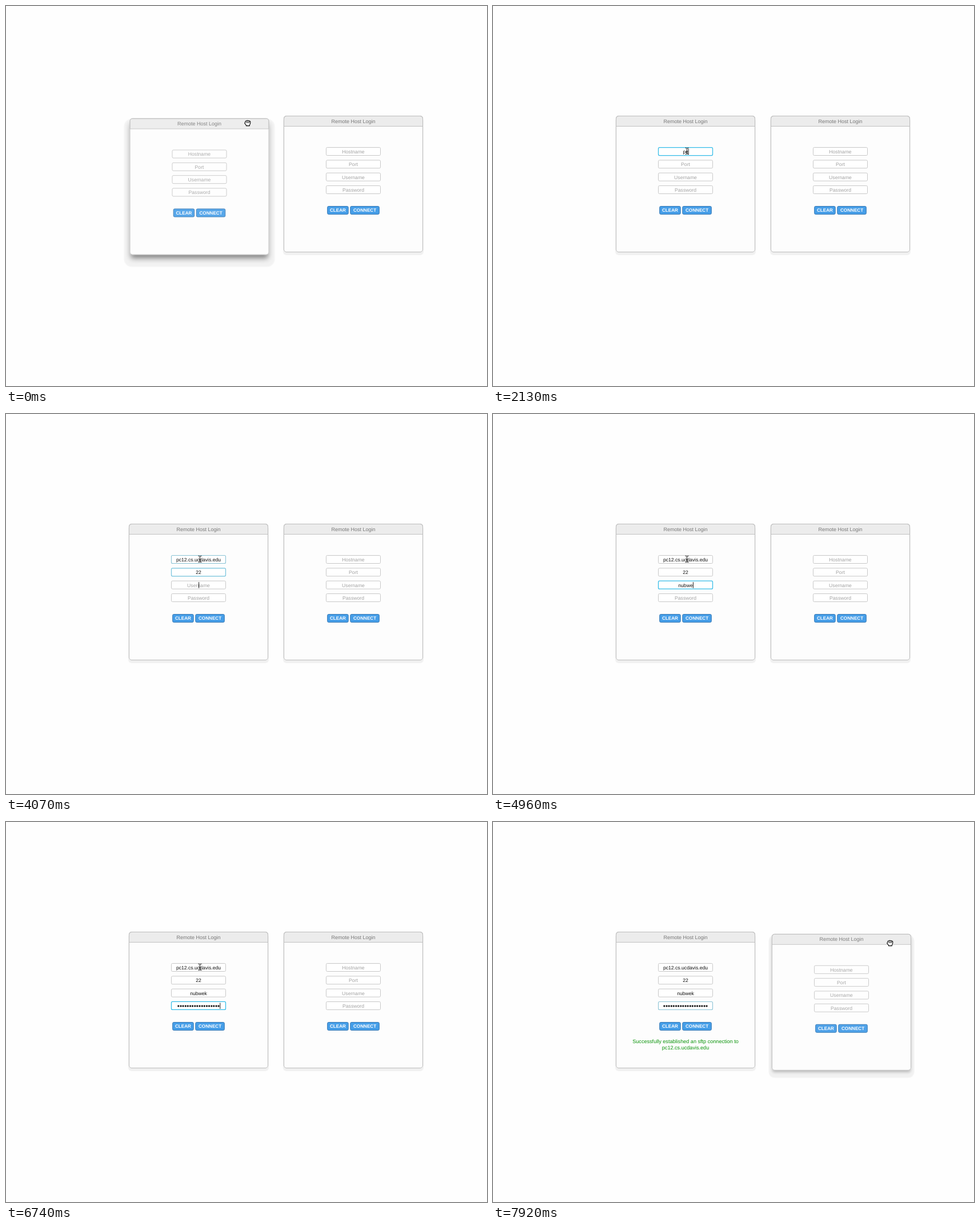
Write an HTML page that moves like this. It is 842 by 665 pixels and loops after 8 s.

```html
<!DOCTYPE html>
<html lang="en">
<head>
<meta charset="utf-8">
<title>Remote Host Login</title>
<style>
html, body { margin: 0; width: 100%; height: 100%; overflow: hidden; background: #fefefe; }
.win { position: absolute; top: 192px; width: 244px; height: 239px; border-radius: 5px; background: #fdfdfd; }
svg { position: absolute; left: 0; top: 0; overflow: visible; }
text { font-family: "Liberation Sans", Arial, sans-serif; text-anchor: middle; text-rendering: geometricPrecision; }
.title { font-size: 9px; fill: #777; }
.field { font-size: 8.65px; }
.btn { font-size: 8.15px; font-weight: bold; fill: #fff; }
.msg { font-size: 9.1px; fill: #0a940a; }
</style>
</head>
<body>
<script>
const LOOP = 8000, STEP = 148.6, LEAD = 40;
const FADE = 3.4; // in steps, like every time below
const MID = 122;
const HOST = 'pc12.cs.ucdavis.edu';
const NS = 'http://www.w3.org/2000/svg';

// When a field gains and loses focus, when typing starts, characters per step
const FIELDS = [
  { hint: 'Hostname', value: HOST, on: 8, off: 25, start: 13, rate: 1.6 },
  { hint: 'Port', value: '22', on: 25, off: 27, start: 26, rate: 2 },
  { hint: 'Username', value: 'nubwek', on: 27, off: 35, start: 28, rate: .9 },
  { hint: 'Password', value: '•'.repeat(19), on: 35, off: 51, start: 36, rate: 1.95 }
];

// Pointer stops: step, x, y
const STOPS = [
  [0, 423, 205], [1, 421, 202], [4, 341, 254], [5, 339.5, 254], [45, 339.5, 254],
  [47, 445, 408], [50, 693, 208], [51, 693, 208], [53, 695, 212]
];
const SHAPES = {
  hand: {
    d: 'M-4.2-2.4Q-3.6-4.5-2-3.9Q-.9-5.2.5-4.2Q2-5 2.9-3.6Q4.8-3.8 4.8-1.8Q5 1.5 3.4 3.2V4.6H-2.6V3.3' +
       'L-4.8.9Q-5.6-.8-4.2-1ZM-1.8-2.4V-.8M.4-2.6V-.8M2.6-2.4V-.8',
    fill: '#fff', stroke: '#000', 'stroke-width': 1.1
  },
  beam: {
    d: 'M-2.4-5.7Q0-5.7 0-4.4V4.4Q0 5.7-2.4 5.7M2.4-5.7Q0-5.7 0-4.4M0 4.4Q0 5.7 2.4 5.7M-1.2 1H1.2',
    fill: 'none', stroke: '#111', 'stroke-width': 1
  },
  arrow: {
    d: 'M0 0V10.5L2.4 8.2L4.2 12.2L5.9 11.5L4.2 7.6H7.4Z',
    fill: '#000', stroke: '#fff', 'stroke-width': .8
  }
};

const clamp = v => Math.max(0, Math.min(1, v));
const lerp = (a, b, k) => a + (b - a) * k;
const blend = (a, b, k) => `rgb(${a.map((v, i) => Math.round(lerp(v, b[i], k)))})`;

function set(el, attrs) {
  for (const k in attrs) el.setAttribute(k, attrs[k]);
  return el;
}

function add(parent, tag, attrs, str) {
  const el = set(document.createElementNS(NS, tag), attrs);
  if (str) el.textContent = str;
  return parent.appendChild(el);
}

function label(parent, cls, x, y, str) {
  return add(parent, 'text', { class: cls, x, y }, str);
}

function makeField(svg, hint, i) {
  const y = 55.5 + 22.33 * i;
  const frame = add(svg, 'rect', { x: 74.5, y, width: 95, height: 14, rx: 2, fill: '#fff' });
  const text = label(svg, 'field', MID, y + 10.4, hint);
  const caret = add(svg, 'rect', { y: y + 2, width: .9, height: 10.5 });
  const field = { y, frame, text, caret };
  drawField(field, { hint, value: '', on: Infinity, off: Infinity, start: Infinity, rate: 1 }, 0);
  return field;
}

function makeWindow(left) {
  const box = document.body.appendChild(document.createElement('div'));
  box.className = 'win';
  box.style.left = left + 'px';
  const svg = add(box, 'svg', { width: 244, height: 239 });
  add(svg, 'path', { d: 'M.5 18.5V5Q.5.5 5 .5H239Q243.5.5 243.5 5V18.5Z', fill: '#ececec', stroke: '#c2c2c2' });
  add(svg, 'rect', { x: .5, y: .5, width: 243, height: 238, rx: 4.5, fill: 'none', stroke: '#bcbcbc' });
  label(svg, 'title', MID, 12.5, 'Remote Host Login');
  const fields = FIELDS.map((f, i) => makeField(svg, f.hint, i));
  [['CLEAR', 76.7, 36.5], ['CONNECT', 116.8, 50.5]].forEach(([str, x, width]) => {
    add(svg, 'rect', { x, y: 158.5, width, height: 14, rx: 2, fill: '#469ee8', stroke: '#3577b3' });
    label(svg, 'btn', x + width / 2, 168.4, str);
  });
  return { box, svg, fields };
}

function placeWindow({ box }, dx, dy, lift) {
  box.style.transform = `translate(${dx}px,${dy}px)`;
  box.style.opacity = 1 - .1 * lift;
  box.style.boxShadow =
    `0 ${8 * lift}px ${10 * lift}px ${-2 * lift}px rgba(0,0,0,${.5 * lift}),` +
    `0 ${lerp(4, 11, lift)}px ${1 + lift}px ${lerp(1, 10, lift)}px rgba(0,0,0,.055)`;
}

function drawField(el, { hint, value, on, off, start, rate }, k) {
  const shown = value.slice(0, Math.max(0, Math.ceil(.4 + rate * (k - start))));
  const typing = k >= start && value !== '';
  const glow = clamp((k - on) / FADE) * (1 - clamp((k - off) / FADE));
  const dots = typing && value[0] === '•';
  set(el.frame, { stroke: blend([200, 200, 200], [52, 188, 232], glow), 'stroke-width': 1 + .25 * glow });
  el.text.textContent = typing ? shown : hint;
  el.text.style.fill = typing ? '#111' : '#a2a2a2';
  el.text.style.fontSize = dots ? '11.8px' : '';
  el.text.setAttribute('y', el.y + (dots ? 11.6 : 10.4));
  const end = typing ? el.text.getComputedTextLength() / 2 : 0;
  set(el.caret, { x: MID + end + .2, visibility: k >= on && k < off ? 'visible' : 'hidden' });
}

function drawPointer(k) {
  const i = Math.max(1, STOPS.findIndex(s => s[0] >= k));
  const [k0, x0, y0] = STOPS[i - 1], [k1, x1, y1] = STOPS[i];
  const p = (k - k0) / (k1 - k0), x = lerp(x0, x1, p), y = lerp(y0, y1, p);
  const overField = Math.abs(x - 337) < 48 && Math.abs(y - 255) < 8;
  const kind = y < 214 ? 'hand' : overField ? 'beam' : 'arrow';
  set(pointer, { ...SHAPES[kind], transform: `translate(${x} ${y})` });
}

const left = makeWindow(215), right = makeWindow(486);
const msg = add(left.svg, 'g', {});
label(msg, 'msg', MID, 195.3, 'Successfully established an sftp connection to');
label(msg, 'msg', MID, 205.7, HOST);
const layer = add(document.body, 'svg', { width: 842, height: 665 });
const pointer = add(layer, 'path', { 'stroke-linejoin': 'round', 'stroke-linecap': 'round' });

function draw(k) {
  const drop = clamp(1 - k / 2), pull = clamp((k - 51) / 2);
  placeWindow(left, 1.5 * drop, 4.5 * drop, 1 - clamp((k - 2.4) / 4));
  placeWindow(right, 2 * pull, 3.8 * pull, clamp((k - 51) / 4));
  left.fields.forEach((el, i) => drawField(el, FIELDS[i], k));
  msg.setAttribute('visibility', k >= 48 ? 'visible' : 'hidden');
  drawPointer(k);
}

const begin = performance.now();
let last = -1;
function loop(now) {
  const t = Math.max(0, now - begin) % LOOP;
  const k = Math.max(0, Math.floor((t - LEAD) / STEP));
  if (k !== last) draw(last = k);
  requestAnimationFrame(loop);
}
loop(begin);
</script>
</body>
</html>
```
